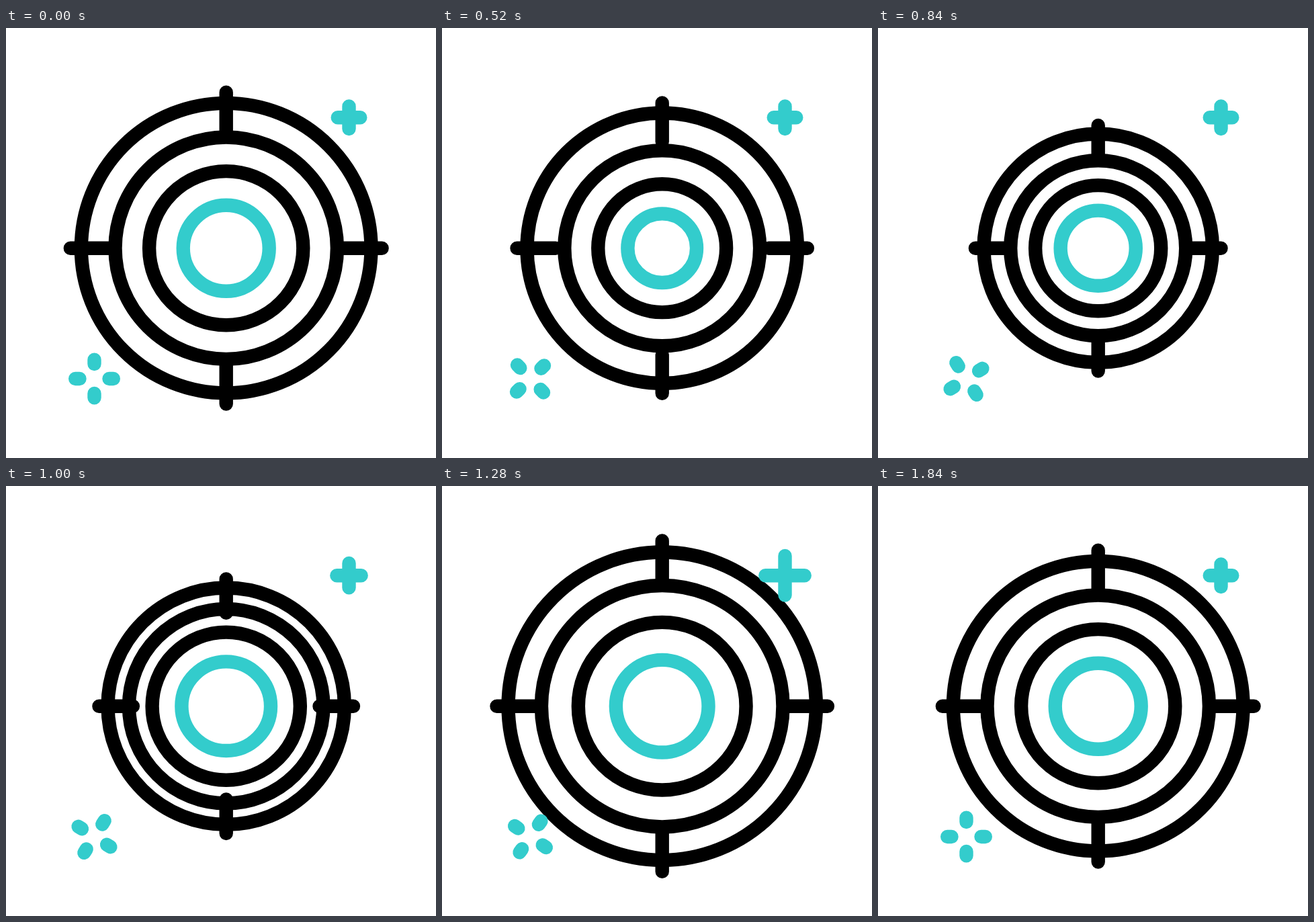
An HTML page with a canvas that plays this animation: 640x640 px, repeating every 2 s.

```html
<!DOCTYPE html>
<html lang="en">
<head>
<meta charset="utf-8">
<title>Pulsing target</title>
<style>
  html, body { margin: 0; width: 100%; height: 100%; overflow: hidden; background: #fff; }
  canvas { display: block; width: 100vw; height: 100vh; }
</style>
</head>
<body>
<canvas id="stage" width="640" height="640"></canvas>
<script>
const ctx = document.getElementById('stage').getContext('2d');
const LOOP = 2000, STEP = 40;
const BLACK = '#000', TEAL = '#33cccc';
const CENTER = 327.7, LINE = 20.4;
const STAGGER = 80;
const INNER = 64, GAP = 50.6;

// Key poses as [time, value]
const PULSE = [[40, 1], [640, 0.787], [1160, 1.091], [1560, 1]];
const GROW = [[880, 16.8], [1360, 29.8], [1780, 16.8]];
const TURN = [[40, 0], [1800, Math.PI * 2]];

// Symmetric cubic-bezier(a, 0, 1 - a, 1), solved by bisection
function ease(x, a) {
  let lo = 0, hi = 1;
  for (let i = 0; i < 30; i++) {
    const u = (lo + hi) / 2, v = 1 - u;
    const bx = 3 * a * u * v * v + 3 * (1 - a) * u * u * v + u * u * u;
    if (bx < x) lo = u; else hi = u;
  }
  return lo * lo * (3 - 2 * lo);
}

// Eased value between the key poses, held before and after them
function track(keys, t, a = 0.5) {
  if (t <= keys[0][0]) return keys[0][1];
  const next = keys.findIndex(([time]) => time > t);
  if (next < 0) return keys[keys.length - 1][1];
  const [t0, v0] = keys[next - 1], [t1, v1] = keys[next];
  return v0 + (v1 - v0) * ease((t - t0) / (t1 - t0), a);
}

// Radius of ring i; the innermost ring leads
const radius = (i, t) => (INNER + GAP * i) * track(PULSE, t - i * STAGGER, 0.47);

function ring(r, color) {
  ctx.strokeStyle = color;
  ctx.beginPath();
  ctx.arc(CENTER, CENTER, r, 0, Math.PI * 2);
  ctx.stroke();
}

// Four radial dashes around a point
function spokes(x, y, from, to, color, angle = 0) {
  ctx.save();
  ctx.translate(x, y);
  ctx.rotate(angle);
  ctx.strokeStyle = color;
  ctx.beginPath();
  for (let i = 0; i < 4; i++) {
    ctx.moveTo(from, 0);
    ctx.lineTo(to, 0);
    ctx.rotate(Math.PI / 2);
  }
  ctx.stroke();
  ctx.restore();
}

function draw(t) {
  ctx.fillStyle = '#fff';
  ctx.fillRect(0, 0, 640, 640);
  ctx.lineWidth = LINE;
  ctx.lineCap = 'round';

  for (let i = 0; i < 4; i++) ring(radius(i, t), i ? BLACK : TEAL);
  const outer = radius(3, t);
  spokes(CENTER, CENTER, outer * 0.788, outer * 1.0745, BLACK);

  spokes(510.5, 133.2, 0, track(GROW, t), TEAL);
  spokes(131.5, 522, 22, 28.3, TEAL, track(TURN, t));
}

const start = performance.now();
function tick() {
  const t = Math.max(0, performance.now() - start) % LOOP;
  draw(Math.floor(t / STEP) * STEP);
  requestAnimationFrame(tick);
}
tick();
</script>
</body>
</html>
```
